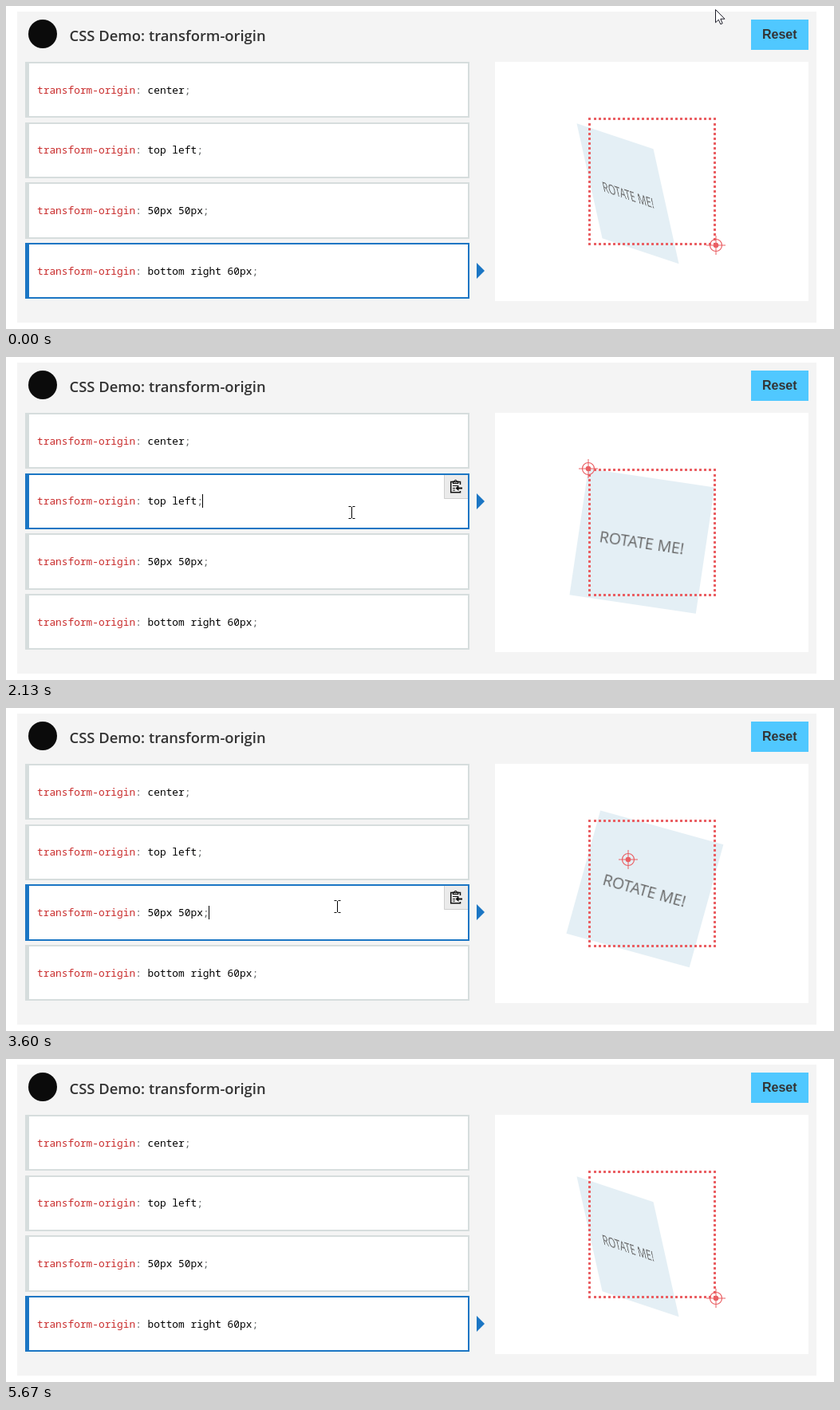
An HTML page that plays this animation: 1038 px wide and 405 px high, repeating every 5.81 s.

```html
<!DOCTYPE html>
<html lang="en">
<head>
<meta charset="utf-8">
<title>CSS Demo: transform-origin</title>
<style>
  :root { --loop: 5810ms; --blue: #1b76c4; --gray: #d6dddd; --red: #ea5f63; }
  html, body { margin: 0; width: 100%; height: 100%; overflow: hidden; background: #fff; }
  svg, .box, .frame { position: absolute; }
  svg { left: 0; top: 0; }
  .code { font: 12.83px "Noto Sans Mono", monospace; white-space: pre; }
  .prop { fill: #c92c2c; }
  .punc { fill: #5f6364; }
  .title { font: 600 18.4px "Open Sans", sans-serif; fill: #333; }
  .reset { font: bold 16px "Liberation Sans", sans-serif; fill: #333; }

  .box, .frame { left: 730px; top: 140px; width: 160px; height: 160px; box-sizing: border-box; }
  .box {
    display: flex; align-items: center; justify-content: center; padding-top: 3px;
    background: #e4eff5; color: #666; white-space: nowrap;
    font: 19.4px "Open Sans", sans-serif;
    animation: turn var(--loop) infinite, pivot var(--loop) step-end infinite;
  }
  .frame { border: 3px dotted var(--red); }

  .row1 { animation: row1 var(--loop) infinite; }
  .row2 { animation: row2 var(--loop) infinite; }
  .row3 { animation: row3 var(--loop) infinite; }
  .row4 { animation: row4 var(--loop) infinite; }
  .tip { fill: var(--blue); }
  .tip1 { animation: tip1 var(--loop) infinite; }
  .tip2 { animation: tip2 var(--loop) infinite; }
  .tip3 { animation: tip3 var(--loop) infinite; }
  .tip4 { animation: tip4 var(--loop) infinite; }

  .button { animation: hover var(--loop) step-end infinite; }
  .aim { animation: aim var(--loop) step-end infinite; }
  .copy { animation: copy var(--loop) step-end infinite; }
  .caret { animation: caret var(--loop) step-end infinite; }
  .mouse { animation: move var(--loop) ease-in-out infinite; }
  .arrow { animation: arrow var(--loop) step-end infinite; }
  .hand { animation: hand var(--loop) step-end infinite; }
  .beam { animation: beam var(--loop) step-end infinite; }

  @keyframes turn {
    0%, 11.015% { transform: rotate3d(1, 2, 0, 60deg); }
    11.016% { transform: rotate(0deg); }
    28.227%, 33.338% { transform: rotate(30deg); }
    33.339% { transform: rotate(0deg); }
    50.551%, 56.798% { transform: rotate(30deg); }
    56.799% { transform: rotate(0deg); }
    74.01%, 77.916% { transform: rotate(30deg); }
    77.917% { transform: rotate3d(1, 2, 0, 0deg); }
    95.129%, 100% { transform: rotate3d(1, 2, 0, 60deg); }
  }
  @keyframes pivot {
    0%, 77.917%, 100% { transform-origin: 100% 100% 60px; }
    11.016% { transform-origin: 50% 50% 0; }
    33.339% { transform-origin: 0 0 0; }
    56.799% { transform-origin: 50px 50px 0; }
  }
  @keyframes aim {
    0%, 77.917%, 100% { transform: translate(890px, 300px); }
    11.016% { transform: translate(810px, 220px); }
    33.339% { transform: translate(730px, 140px); }
    56.799% { transform: translate(780px, 190px); }
  }

  /* row borders: hover or selection, 200 ms each way */
  @keyframes row1 {
    0%, 11.015%, 36.781%, 100% { fill: var(--gray); }
    14.458%, 33.339% { fill: var(--blue); }
  }
  @keyframes row2 {
    0%, 21%, 60.241%, 100% { fill: var(--gray); }
    24.44%, 56.799% { fill: var(--blue); }
  }
  @keyframes row3 {
    0%, 52.668%, 81.36%, 100% { fill: var(--gray); }
    56.11%, 77.917% { fill: var(--blue); }
  }
  @keyframes row4 {
    0%, 11.015%, 75.731%, 100% { fill: var(--blue); }
    14.458%, 72.289% { fill: var(--gray); }
  }

  @keyframes tip1 {
    0%, 11.015%, 36.781%, 100% { opacity: 0; transform: none; }
    14.458%, 33.339% { opacity: 1; transform: translate(10px); }
  }
  @keyframes tip2 {
    0%, 33.339%, 60.241%, 100% { opacity: 0; transform: none; }
    36.781%, 56.799% { opacity: 1; transform: translate(10px); }
  }
  @keyframes tip3 {
    0%, 56.799%, 81.36%, 100% { opacity: 0; transform: none; }
    60.241%, 77.917% { opacity: 1; transform: translate(10px); }
  }
  @keyframes tip4 {
    0%, 11.015%, 81.36%, 100% { opacity: 1; transform: translate(10px); }
    14.458%, 77.917% { opacity: 0; transform: none; }
  }

  @keyframes hover {
    0%, 13.25%, 100% { fill: #50c8ff; }
    4.3% { fill: #3dbdf7; }
  }
  @keyframes copy {
    0%, 90.7%, 100% { opacity: 0; transform: translate(549px, 299px); }
    33.339% { opacity: 1; transform: translate(549px, 148px); }
    56.799% { opacity: 1; transform: translate(549px, 223px); }
    77.917% { opacity: 1; transform: translate(549px, 299px); }
  }
  @keyframes caret {
    0%, 42.461%, 65.921%, 86.747%, 97.59%, 100% { opacity: 0; transform: none; }
    33.339%, 51.583% { opacity: 1; transform: translate(246px, 172px); }
    56.799%, 75.043% { opacity: 1; transform: translate(254px, 248px); }
    77.917%, 95.181% { opacity: 1; transform: translate(316px, 324px); }
  }

  @keyframes move {
    0%, 1.1% { transform: translate(889px, 4px); }
    6.885% { transform: translate(968px, 40px); }
    11.36% { transform: translate(968px, 40px); animation-timing-function: linear; }
    13.77% { transform: translate(1007px, 60px); animation-timing-function: ease-in; }
    20.654% { transform: translate(592px, 190px); animation-timing-function: ease-out; }
    27.54%, 51.29% { transform: translate(433px, 195px); }
    53.873%, 71.084% { transform: translate(415px, 249px); }
    75.387%, 87.78% { transform: translate(425px, 324px); }
    91.738%, 100% { transform: translate(600px, 315px); }
  }
  @keyframes arrow {
    0%, 13.25% { opacity: 1; }
    4.3%, 21%, 100% { opacity: 0; }
  }
  @keyframes hand {
    0%, 13.25%, 100% { opacity: 0; }
    4.3% { opacity: 1; }
  }
  @keyframes beam {
    0%, 90.7%, 100% { opacity: 0; }
    21% { opacity: 1; }
  }
</style>
</head>
<body>
<svg width="1038" height="405">
  <rect x="14" y="7" width="1002" height="390" fill="#f4f4f4"/>
  <circle cx="46" cy="35" r="18" fill="#0b0b0b"/>
  <text class="title" x="79.5" y="44">CSS Demo: transform-origin</text>
  <rect class="button" x="934" y="17" width="72" height="38"/>
  <text class="reset" x="948" y="41">Reset</text>
  <rect x="613" y="70" width="393" height="300" fill="#fff"/>

  <g class="row1"><rect x="24" y="70" width="557" height="70"/><rect x="29" y="72" width="550" height="66" fill="#fff"/></g>
  <g class="row2"><rect x="24" y="146" width="557" height="70"/><rect x="29" y="148" width="550" height="66" fill="#fff"/></g>
  <g class="row3"><rect x="24" y="221" width="557" height="71"/><rect x="29" y="223" width="550" height="67" fill="#fff"/></g>
  <g class="row4"><rect x="24" y="297" width="557" height="70"/><rect x="29" y="299" width="550" height="66" fill="#fff"/></g>

  <g class="tip">
    <g transform="translate(580 105)"><path class="tip1" d="M0-10 10 0 0 10z"/></g>
    <g transform="translate(580 181)"><path class="tip2" d="M0-10 10 0 0 10z"/></g>
    <g transform="translate(580 256)"><path class="tip3" d="M0-10 10 0 0 10z"/></g>
    <g transform="translate(580 332)"><path class="tip4" d="M0-10 10 0 0 10z"/></g>
  </g>

  <g class="code">
    <text x="39" y="110"><tspan class="prop">transform-origin</tspan><tspan class="punc">:</tspan> center<tspan class="punc">;</tspan></text>
    <text x="39" y="185"><tspan class="prop">transform-origin</tspan><tspan class="punc">:</tspan> top left<tspan class="punc">;</tspan></text>
    <text x="39" y="261"><tspan class="prop">transform-origin</tspan><tspan class="punc">:</tspan> 50px 50px<tspan class="punc">;</tspan></text>
    <text x="39" y="337"><tspan class="prop">transform-origin</tspan><tspan class="punc">:</tspan> bottom right 60px<tspan class="punc">;</tspan></text>
  </g>
</svg>

<div class="box">ROTATE ME!</div>
<div class="frame"></div>

<svg width="1038" height="405">
  <g class="aim" fill="none" stroke="#ea5f63">
    <circle r="7.5" stroke-width="1.2"/>
    <path d="M-12 0H12M0-12V12"/>
    <circle r="3.3" fill="#ea5f63" stroke="none"/>
  </g>

  <g class="copy">
    <rect width="30" height="30" fill="#ebebeb"/>
    <path d="M.5 0V29.5H30" fill="none" stroke="#cfcfcf"/>
    <g fill="none" stroke="#111" stroke-width="1.5">
      <path d="M20.5 12V8.5H8.7V21.7H20.5V20"/>
      <path d="M11.5 10.5V8H13Q14.6 4.5 16.2 8H17.7V10.5z" stroke-width="1.2"/>
      <path d="M11 13.5H18M11 16.5H14M11 19H14" stroke-width="1"/>
      <path d="M23 16.5H17" stroke-width="2"/>
    </g>
    <path d="M14.5 16.5 18.5 13V20z" fill="#111"/>
  </g>

  <rect class="caret" width="1" height="17" fill="#000"/>

  <g class="mouse" stroke="#1c1c28" fill="#fff">
    <path class="arrow" d="M.5.5V16.8L4.3 13.2 6.8 18.8 9.2 17.8 6.8 12.2H12z"/>
    <path class="hand" d="M-1.5 1.5Q0-1 1.5 1.5V7Q4 6 4.5 8 7 7 7.5 9 10.5 8.5 10.5 11V15Q10 18 8.5 20V21.5H-1V20L-5.5 12.5Q-5 9.5-1.5 13z"/>
    <path class="beam" d="M-3.5-7.5H-.5M1.5-7.5H4.5M.5-7V7M-3.5 7.5H-.5M1.5 7.5H4.5" fill="none" stroke="#000"/>
  </g>
</svg>
</body>
</html>
```
